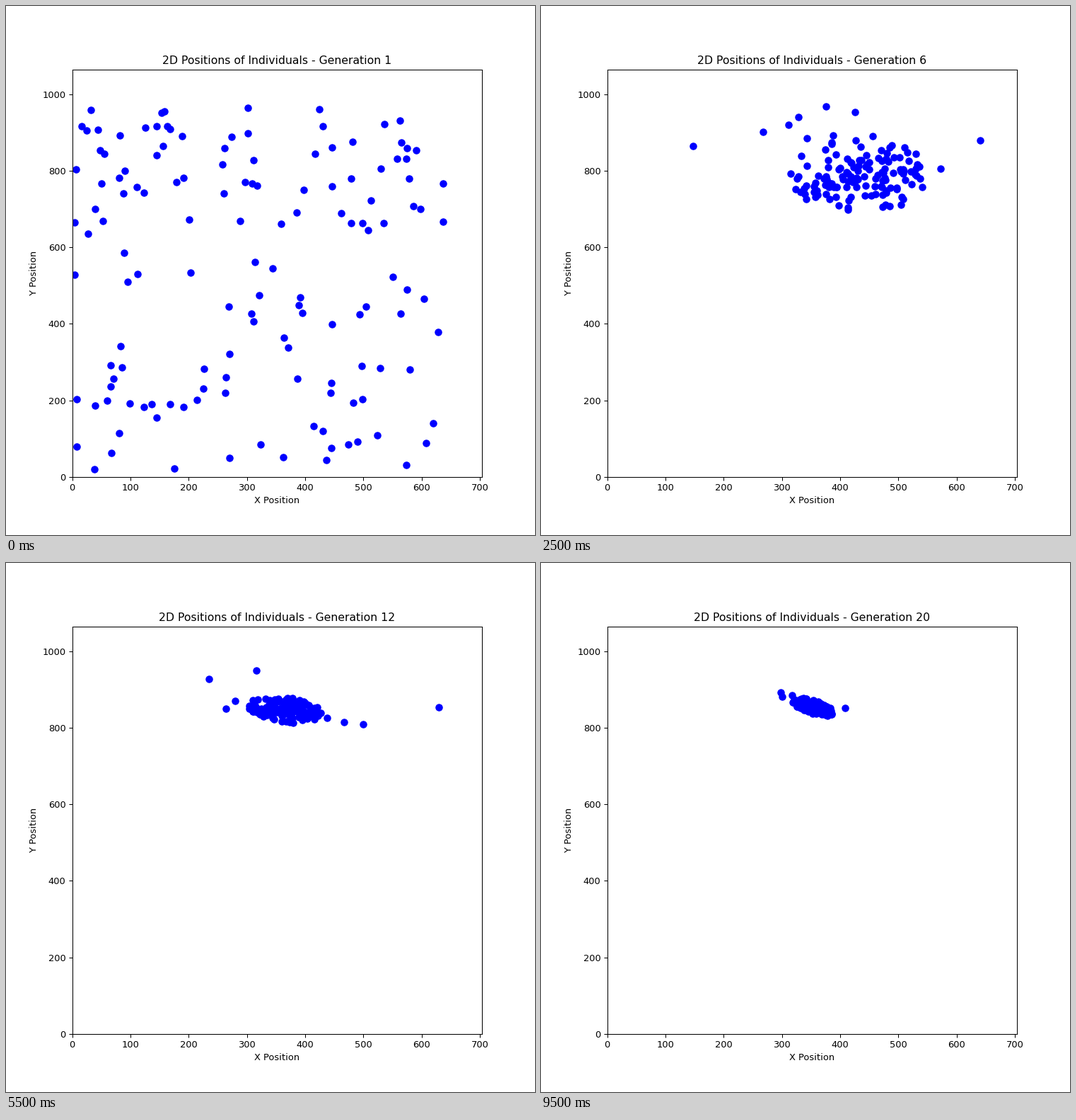
Write a matplotlib script that moves like this. It is 748 px wide and 748 px high and loops after 10 s.

```python
import matplotlib.pyplot as plt
import numpy as np
from matplotlib.animation import FuncAnimation

STAGE, INCHES = 748, 8
WORLD = np.array([640, 968])
GENERATIONS, POPULATION = 20, 140

# Swarm shape at a few generations, interpolated between them:
# generation, centre x, y, core spread x, y, slope,
# share of mutants, mutant spread x, y
SWARM = np.array([
    (2, 385, 690, 115, 135, 0.0, 0.32, 190, 190),
    (4, 415, 755, 78, 65, 0.0, 0.30, 150, 130),
    (6, 430, 785, 60, 48, 0.0, 0.24, 115, 100),
    (8, 420, 825, 60, 30, -0.1, 0.20, 120, 90),
    (12, 365, 848, 32, 17, -0.15, 0.17, 105, 80),
    (16, 355, 862, 19, 14, -0.4, 0.12, 60, 60),
    (20, 353, 855, 18, 9, -0.4, 0.08, 38, 28),
])


def swarm_at(generation):
    return [np.interp(generation, SWARM[:, 0], column)
            for column in SWARM.T[1:]]


def random_disc(rng, n):
    angle = rng.uniform(0, 2 * np.pi, n)
    radius = 2 * rng.random(n) ** 0.65
    return radius * np.cos(angle), radius * np.sin(angle)


def next_generation(rng, old, generation):
    """Keep some individuals near the swarm and replace all others."""
    cx, cy, sx, sy, slope, share, wide_x, wide_y = swarm_at(generation)
    n = len(old)

    dx, dy = old[:, 0] - cx, old[:, 1] - cy
    near = np.hypot(dx / sx, (dy - slope * dx) / sy) < 2
    survives = near & (rng.random(n) < 0.6)

    core_x, core_y = random_disc(rng, n)
    mutant = rng.random(n) < share
    dx = np.where(mutant, rng.normal(0, wide_x, n), core_x * sx)
    rise = wide_y * (np.abs(rng.normal(size=n)) - 0.3)
    dy = np.where(mutant, rise, core_y * sy) + slope * dx
    born = np.clip(np.column_stack([cx + dx, cy + dy]), 0, WORLD)
    return np.where(survives[:, None], old, born)


def evolve():
    rng = np.random.default_rng(12)
    populations = [rng.uniform((3, 10), WORLD, (POPULATION, 2))]
    for generation in range(2, GENERATIONS + 1):
        populations.append(next_generation(rng, populations[-1], generation))
    return populations


populations = evolve()

fig, ax = plt.subplots(figsize=(INCHES, INCHES), dpi=STAGE / INCHES)
dots = ax.scatter([], [], s=50, c="blue")
ax.set_xlim(0, WORLD[0] * 1.1)
ax.set_ylim(0, WORLD[1] * 1.1)
ax.set_xlabel("X Position")
ax.set_ylabel("Y Position")
title = ax.set_title("")


def draw(frame):
    dots.set_offsets(populations[frame])
    title.set_text(f"2D Positions of Individuals - Generation {frame + 1}")
    return dots, title


anim = FuncAnimation(fig, draw, frames=GENERATIONS, init_func=lambda: draw(0),
                     interval=500, repeat=True, repeat_delay=0)
plt.show()
```
